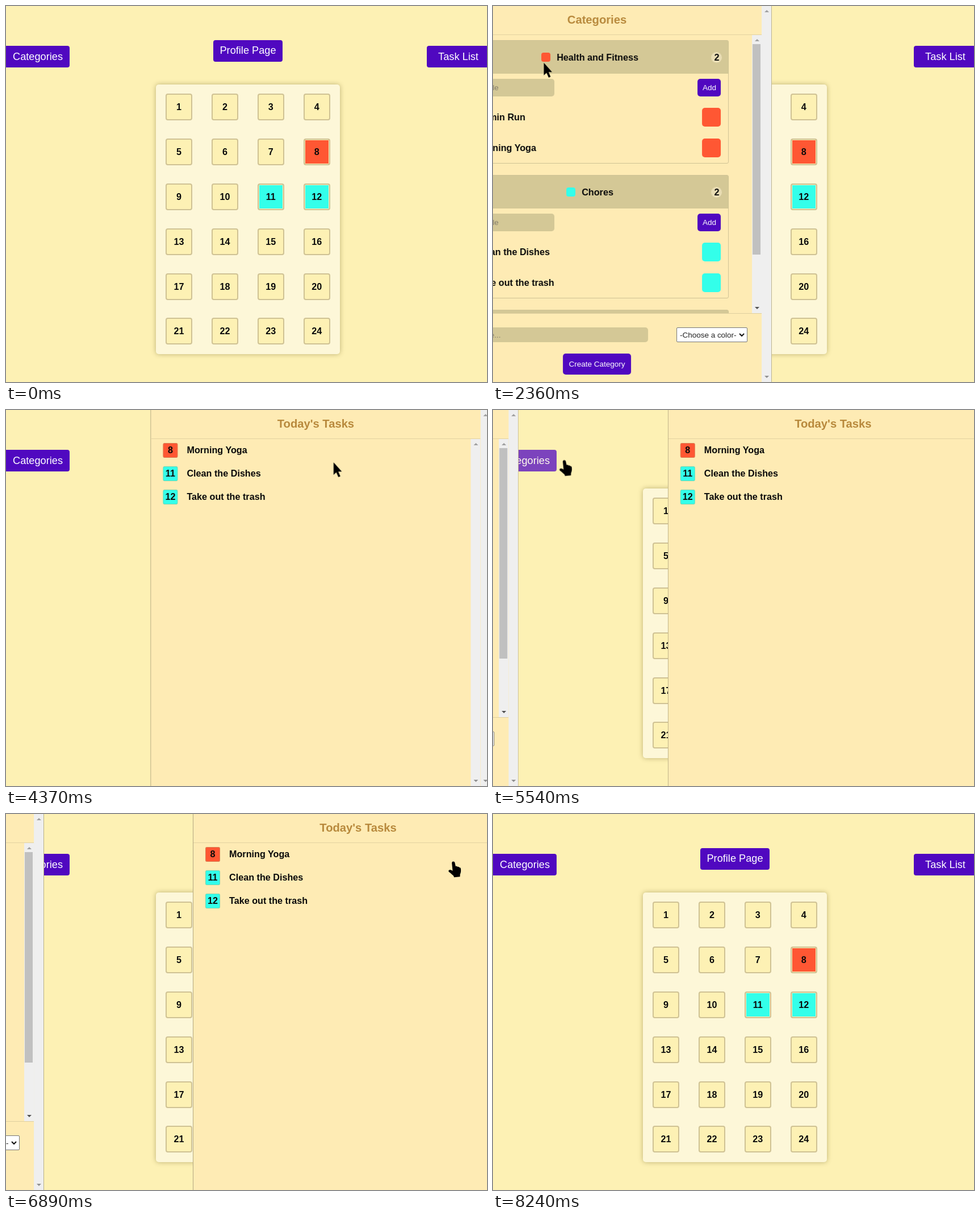
Recreate the animation shown at these times as an HTML page. Size 847 by 661 pixels, loop 9.36 s.

```html
<!DOCTYPE html>
<html lang="en">
<head>
<meta charset="utf-8">
<title>Habit planner</title>
<style>
:root {
  --bg: #fdf1b4; --panel: #feebb4; --tan: #d4c896; --line: #cfc294;
  --violet: #5008c0; --red: #ff5733; --cyan: #33ffea; --loop: 9360ms; --small: 13.48px;
}
* { box-sizing: border-box; }
html, body { margin: 0; width: 100%; height: 100%; overflow: hidden; }
body { position: relative; background: var(--bg); color: #0a0a0a; font: bold 16.18px "Liberation Sans", Arial, sans-serif; }
.abs, .cell, .card, .bar, .panel, .row, .btn { position: absolute; }
.btn, .cell, .mid { display: flex; align-items: center; justify-content: center; }
.btn { background: var(--violet); color: #fff; border-radius: 5px; font-size: var(--small); font-weight: normal; white-space: nowrap; }
.nav { height: 38px; font-size: 18.2px; border-radius: 4px; }
.red { background: var(--red); }
.cyan { background: var(--cyan); }

#board { left: 264px; top: 138px; width: 324px; height: 474px; border-radius: 5px; background: #fdf7d8; box-shadow: 0 0 9px rgba(90, 80, 20, .4); }
.cell { width: 47px; height: 47px; border: 2px solid var(--line); border-radius: 4px; background: var(--bg); }
.cell.red { background: var(--red); }
.cell.cyan { background: var(--cyan); }
.cell.red, .cell.cyan { box-shadow: inset 0 0 0 1px var(--panel); }

.panel { top: 0; width: 598px; height: 661px; background: var(--panel); overflow: hidden; padding-right: 17px; }
#cats { left: 0; border-right: 1px solid #b8af86; animation: cats var(--loop) ease infinite, catsBar var(--loop) step-end infinite; }
#tasks { left: 249px; border-left: 1px solid #b0a77f; animation: tasks var(--loop) ease infinite, tasksBar var(--loop) step-end infinite; }
.inner { position: relative; width: 100%; height: 100%; background: var(--panel); overflow: hidden; }
.head { height: 51px; padding-bottom: 2px; border-bottom: 1px solid #e3d2a0; color: #b8893c; font-size: 20.2px; }

.bar { right: 0; width: 17px; background: #efefef; }
.bar::before, .bar::after { content: ""; position: absolute; left: 4.5px; border: 4px solid transparent; }
.bar::before { top: 3px; border-bottom-color: #a0a0a0; }
.bar::after { bottom: 3px; border-top-color: #909090; }
.bar.live::after { border-top-color: #505050; }
.bar.full { top: 0; height: 661px; }
.thumb { left: 1px; top: 16px; width: 14px; height: 370px; background: #c0c0c0; }

#list { left: 0; right: 17px; top: 51px; height: 489px; overflow: hidden; }
.card { left: 7.4%; width: 85.4%; height: 217px; border: 1px solid var(--line); border-radius: 3px; }
.top { height: 58px; padding: 0 11px; background: var(--tan); display: flex; align-items: center; justify-content: space-between; }
.dot { width: 19px; height: 19px; border-radius: 50%; background: #e9ddb4; }
.name { display: flex; align-items: center; margin-right: 9px; }
.name i { width: 16px; height: 16px; border-radius: 4px; margin-right: 11px; }
.field { background: var(--tan); border-radius: 5px; color: #827c6b; font-size: var(--small); font-weight: normal; display: flex; align-items: center; padding-left: 6px; }
.row { left: 12px; right: 13px; height: 33px; display: flex; align-items: center; }
.row svg { width: 17px; height: 17px; margin-right: 5px; }
.row i { width: 33px; height: 33px; border-radius: 5px; margin-left: auto; }
#foot { left: 0; right: 0; top: 540px; height: 121px; border-top: 1px solid #dfcf9f; background: var(--panel); }
#pick { right: 25px; top: 24px; width: 125px; height: 26px; border: 1px solid #767676; border-radius: 2px; background: #fff; color: #222; font-size: var(--small); font-weight: normal; padding-left: 5px; display: flex; align-items: center; white-space: nowrap; }
.todo { left: 21px; height: 26px; }
.todo b { width: 26px; height: 26px; border-radius: 3px; box-shadow: inset 0 0 0 1px rgba(180, 170, 120, .5); margin-right: 16px; }

#cursor { left: 0; top: 0; width: 24px; height: 30px; animation: move var(--loop) linear infinite, show var(--loop) step-end infinite; }
#cursor svg { position: absolute; left: 0; top: 0; }
#arrow { animation: arrow var(--loop) step-end infinite; }
#hand { animation: hand var(--loop) step-end infinite; }
#catBtn { animation: catHover var(--loop) linear infinite; }
#taskBtn { animation: taskHover var(--loop) linear infinite; }

@keyframes cats {
  0%, 22.703%, 47.3%, 58.707%, 75.673%, 100% { transform: translateX(-613px); }
  27.511%, 42.5%, 63.515%, 70.865% { transform: none; }
}
@keyframes tasks {
  0%, 42.5%, 63.515%, 70.865%, 86.165%, 100% { transform: translateX(598px); }
  47.3%, 58.707%, 75.673%, 81.357% { transform: none; }
}
@keyframes catsBar {
  0%, 42.5%, 70.865%, 100% { padding-right: 17px; }
  27.1%, 63.1% { padding-right: 0; }
}
@keyframes tasksBar {
  0%, 58.707%, 81.357%, 100% { padding-right: 17px; }
  47.1%, 75.5% { padding-right: 0; }
}
@keyframes catHover {
  0%, 15.2%, 24.5%, 53.9%, 60.5%, 100% { opacity: 1; }
  16.1%, 23.6%, 54.9%, 59.6% { opacity: .75; }
}
@keyframes taskHover {
  0%, 35.5%, 43.6%, 66.5%, 72.5%, 100% { opacity: 1; }
  37%, 42.6%, 67.6%, 71.6% { opacity: .75; }
}
@keyframes show {
  0%, 88.03%, 100% { opacity: 0; }
  9.825% { opacity: 1; }
}
@keyframes hand {
  0%, 24.57%, 43.59%, 59.83%, 74.25%, 100% { opacity: 0; }
  15.6%, 35.2%, 54.38%, 66.24% { opacity: 1; }
}
@keyframes arrow {
  0%, 24.57%, 43.59%, 59.83%, 74.25%, 100% { opacity: 1; }
  15.6%, 35.2%, 54.38%, 66.24% { opacity: 0; }
}
@keyframes move {
  0%, 11% { transform: translate(40px, 450px); }
  12.93% { transform: translate(110px, 330px); }
  14% { transform: translate(153px, 220px); }
  15.06% { transform: translate(110px, 130px); }
  16.13%, 17.1% { transform: translate(69px, 102px); }
  19%, 22.7% { transform: translate(64px, 96px); }
  25.32% { transform: translate(90px, 100px); }
  27.46% { transform: translate(300px, 95px); }
  29.38%, 30.34% { transform: translate(513px, 84px); }
  33.23% { transform: translate(660px, 70px); }
  35.36% { transform: translate(741px, 79px); }
  37.5%, 38.57% { transform: translate(762px, 83px); }
  39.5%, 41.13% { transform: translate(764px, 84px); }
  44.66% { transform: translate(680px, 92px); }
  46.69% { transform: translate(577px, 92px); }
  48.61%, 49.68% { transform: translate(429px, 104px); }
  51.82% { transform: translate(280px, 104px); }
  53.85% { transform: translate(120px, 100px); }
  55.98%, 58.5% { transform: translate(62px, 96px); }
  60.26% { transform: translate(200px, 75px); }
  63.25% { transform: translate(742px, 45px); }
  65.7% { transform: translate(760px, 66px); }
  68.7%, 73.72% { transform: translate(779px, 83px); }
  75.86% { transform: translate(480px, 200px); }
  77.99%, 80.88% { transform: translate(110px, 330px); }
  84.4% { transform: translate(80px, 400px); }
  87.07%, 100% { transform: translate(36px, 450px); }
}
</style>
</head>
<body>
<div class="btn nav" id="catBtn" style="left:0;top:70px;width:112px;border-radius:0 4px 4px 0">Categories</div>
<div class="btn nav" style="left:365px;top:60px;width:122px;padding-bottom:2px">Profile Page</div>
<div class="btn nav" id="taskBtn" style="left:741px;top:70px;width:106px;padding-left:5px;border-radius:4px 0 0 4px">Task List</div>
<div class="abs" id="board"></div>

<div class="panel" id="cats">
  <div class="bar full"></div>
  <div class="inner">
    <div class="head mid">Categories</div>
    <div class="abs" id="list"></div>
    <div class="bar live" style="top:51px;height:489px"><div class="abs thumb"></div></div>
    <div class="abs" id="foot">
      <div class="abs field" style="left:24px;top:24px;width:61.3%;height:26px">Category title...</div>
      <div class="abs" id="pick">-Choose a color-<svg class="abs" style="right:4px" width="10" height="8"><path d="M1 2L5 6L9 2" fill="none" stroke="#111" stroke-width="2"/></svg></div>
      <div class="btn" style="left:50%;top:70px;width:120px;height:37px;margin-left:-60px">Create Category</div>
    </div>
  </div>
</div>

<div class="panel" id="tasks">
  <div class="bar full"></div>
  <div class="inner">
    <div class="head mid">Today's Tasks</div>
    <div id="todos"></div>
    <div class="bar" style="top:51px;height:610px"></div>
  </div>
</div>

<div class="abs" id="cursor">
  <svg id="arrow" width="18" height="28"><path d="M.5 0V22L5.2 17.6L9 26L12.4 24.4L8.8 16.2H15Z"/></svg>
  <svg id="hand" width="24" height="30"><path d="M8.2.6C9.8.3 11 1.2 11.4 2.8L12.8 9C14.2 8.4 15.6 8.8 16.2 9.9C17.6 9.5 18.8 10 19.3 11.1C20.8 11 21.7 11.9 21.9 13.4C22.4 17 22 20 20.6 23L20.4 27.2L10 28.3L9 25.6C6.4 23.6 4.2 21.2 1.2 19.1C-.2 17.8.2 15.8 2 15.3C4 14.9 5.6 15.6 7.5 17L6.2 4C5.9 2.2 6.6.9 8.2.6Z"/></svg>
</div>

<script>
const $ = id => document.getElementById(id);
const tint = { 8: 'red', 11: 'cyan', 12: 'cyan' };

$('board').innerHTML = Array.from({ length: 24 }, (_, i) => {
  const x = 17 + (i % 4) * 80.9, y = 16.3 + Math.floor(i / 4) * 78.8;
  return `<div class="cell ${tint[i + 1] || ''}" style="left:${x}px;top:${y}px">${i + 1}</div>`;
}).join('');

const cross = `<svg viewBox="0 0 17 17" fill="none" stroke="#ee2a1e" stroke-width="1.7">
  <circle cx="8.5" cy="8.5" r="7.2"/><path d="M5.8 5.8L11.2 11.2M11.2 5.8L5.8 11.2"/></svg>`;

const row = (text, color, i) =>
  `<div class="row" style="top:${118 + i * 54}px">${cross}${text}<i class="${color}"></i></div>`;

const card = ([name, color, items], i) => `
  <div class="card" style="top:${9 + i * 237}px">
    <div class="top"><span class="dot mid">x</span>
      <span class="name"><i class="${color}"></i>${name}</span>
      <span class="dot mid">${items.length}</span></div>
    <div class="abs field" style="left:12px;top:67px;width:160px;height:31px">Task Title</div>
    <div class="btn" style="right:13px;top:67px;width:41px;height:31px">Add</div>
    ${items.map((text, n) => row(text, color, n)).join('')}
  </div>`;

$('list').innerHTML = [
  ['Health and Fitness', 'red', ['30 min Run', 'Morning Yoga']],
  ['Chores', 'cyan', ['Clean the Dishes', 'Take out the trash']],
  ['', '', []]
].map(card).join('');

$('todos').innerHTML = [[8, 'Morning Yoga'], [11, 'Clean the Dishes'], [12, 'Take out the trash']]
  .map(([n, text], i) =>
    `<div class="row todo" style="top:${57.5 + i * 41.2}px"><b class="mid ${tint[n]}">${n}</b>${text}</div>`)
  .join('');
</script>
</body>
</html>
```
